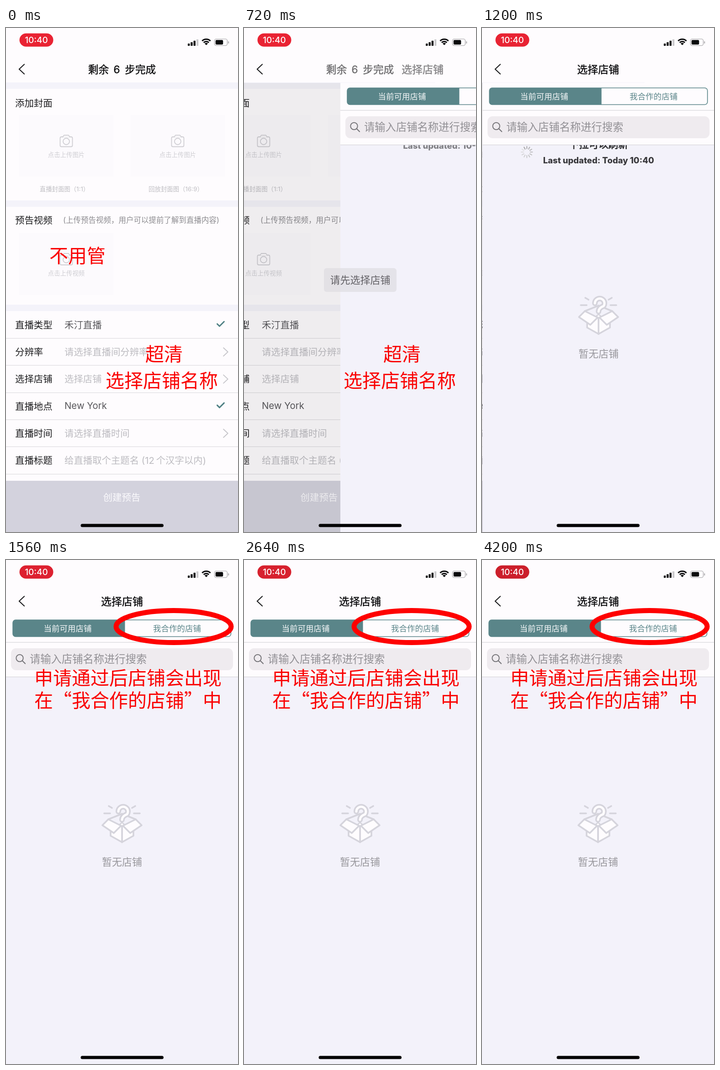
These frames come from a looping animation (508 px wide and 1102 px high, 4.32 s). An HTML page with a canvas:

```html
<!DOCTYPE html>
<html lang="zh-CN">
<head>
<meta charset="utf-8">
<title>选择店铺</title>
<style>
html, body { margin: 0; width: 100%; height: 100%; overflow: hidden; background: #fefcfe; }
canvas { display: block; width: 508px; height: 1102px; }
</style>
</head>
<body>
<canvas id="stage"></canvas>
<script>
const W = 508, H = 1102, LOOP = 4320, STEP = 120, TAU = Math.PI * 2;
const UI = 'Inter, "Noto Sans CJK SC", "Noto Sans CJK", sans-serif';
const HEI = '"Noto Sans CJK SC", "Noto Sans CJK", sans-serif';
const WHITE = '#fefcfe', MIST = '#f3f2fa', TEAL = '#5a8589', RED = '#fa0303';
const LINE = '#d8d7db', HINT = '#bdbcc1', PALE = '#cfced3', INK = '#1c1c1e', BLACK = '#0a0a0c';

const canvas = document.getElementById('stage');
const g = canvas.getContext('2d');
const dpr = window.devicePixelRatio || 1;
canvas.width = W * dpr;
canvas.height = H * dpr;

const clamp = v => Math.max(0, Math.min(1, v));
const mix = (a, b, k) => Math.round(a + (b - a) * k);

// Smooth ramp from 0 at time a to 1 at time b.
function ease(t, a, b) {
  const u = clamp((t - a) / (b - a));
  return u * u * (3 - 2 * u);
}

// y is the optical middle of the line; bold adds a thin outline.
function text(s, x, y, size, color, { align = 'left', weight = 400, font = UI, bold = 0 } = {}) {
  const latin = /^[\x00-\x7f]+$/.test(s);
  const base = y + size * (latin ? 0.35 : 0.375);
  g.font = `${weight} ${size}px ${font}`;
  g.textAlign = align;
  g.fillStyle = color;
  g.fillText(s, x, base);
  if (bold) {
    g.strokeStyle = color;
    g.lineWidth = bold;
    g.lineJoin = 'round';
    g.strokeText(s, x, base);
  }
}
const mid = (s, x, y, size, color, opt) => text(s, x, y, size, color, { align: 'center', ...opt });

function rect(x, y, w, h, color) {
  g.fillStyle = color;
  g.fillRect(x, y, w, h);
}

function paint(fill, stroke, lw) {
  if (fill) { g.fillStyle = fill; g.fill(); }
  if (stroke) { g.strokeStyle = stroke; g.lineWidth = lw; g.stroke(); }
}

function round(x, y, w, h, r, fill, stroke, lw) {
  g.beginPath();
  g.roundRect(x, y, w, h, r);
  paint(fill, stroke, lw);
}

function path(pts, color, lw, fill) {
  g.beginPath();
  for (let i = 0; i < pts.length; i += 2) g.lineTo(pts[i], pts[i + 1]);
  g.lineCap = g.lineJoin = 'round';
  if (fill && color !== fill) g.lineJoin = 'round';
  paint(fill, color, lw);
}

function arc(x, y, r, a, b, color, lw) {
  g.beginPath();
  g.arc(x, y, r, a, b);
  paint(null, color, lw);
}

function layer(alpha, draw) {
  if (alpha <= 0) return;
  g.save();
  g.globalAlpha = alpha;
  draw();
  g.restore();
}

function shifted(x, y, draw) {
  g.save();
  g.translate(x, y);
  draw();
  g.restore();
}

// dir 1 points right, -1 points left
const chevron = (x, y, w, h, dir, color, lw) =>
  path([x - dir * w, y - h, x + dir * w, y, x - dir * w, y + h], color, lw);
const tick = (x, y) => path([x - 7.5, y, x - 2.5, y + 5, x + 7.5, y - 5], '#4f8084', 3);

function camera() {
  round(-13.5, -9, 27, 21.5, 3, null, PALE, 1.8);
  path([-8, -8.5, -5, -12.5, 5, -12.5, 8, -8.5], PALE, 1.8, WHITE);
  arc(0, 1, 7, 0, TAU, PALE, 1.8);
}

function uploadCard(x, y, label) {
  rect(x - 103, y, 206, 135, '#fcfafd');
  shifted(x, y + 57, camera);
  mid(label, x, y + 87, 13.4, PALE);
}

const rows = [
  ['直播类型', '禾汀直播', 'check'],
  ['分辨率', '请选择直播间分辨率', 'more'],
  ['选择店铺', '选择店铺', 'more'],
  ['直播地点', 'New York', 'check'],
  ['直播时间', '请选择直播时间', 'more'],
  ['直播标题', '给直播取个主题名 (12\u2009个汉字以内)', '']
];

function formPage() {
  rect(0, 120, W, H - 120, WHITE);
  for (const y of [119, 377, 605]) rect(0, y, W, 14, '#f4f3fa');

  text('添加封面', 20, 164, 20.4, INK);
  uploadCard(132, 190, '点击上传图片');
  uploadCard(376, 190, '点击上传图片');
  mid('直播封面图（1:1）', 128, 352, 13.4, '#bfbec3');
  mid('回放封面图（16:9）', 372, 352, 13.4, '#bfbec3');

  text('预告视频', 20, 420, 20.4, INK);
  text('(上传预告视频，用户可以提前了解到直播内容)', 125, 420, 16.5, '#8d8c90');
  uploadCard(132, 448.5, '点击上传视频');

  rows.forEach(([label, value, mark], i) => {
    const y = 649 + i * 59.3;
    text(label, 20, y, 20.4, INK);
    text(value, 128, y - (value === 'New York' ? 1 : 0), 20.4, mark === 'check' ? '#59585c' : HINT);
    if (mark === 'check') tick(470, y - 2);
    if (mark === 'more') chevron(481, y, 4.8, 9, 1, '#c6c5ca', 1.9);
    rect(0, Math.round(y + 29), W, 1, LINE);
  });
  rect(0, 990, W, 112, '#d3d2dd');
  mid('创建预告', 253.5, 1026, 20.4, '#fbfafd');
}

function spinner(x, y) {
  for (let i = 0; i < 12; i++) {
    const a = i * TAU / 12 - TAU / 4, c = Math.cos(a), s = Math.sin(a);
    const v = mix(150, 220, ((i + 1) % 12) / 11);
    path([x + 7.5 * c, y + 7.5 * s, x + 12.3 * c, y + 12.3 * s], `rgb(${v},${v},${v})`, 2.1);
  }
}

// An open carton, drawn as one half and its mirror image.
function emptyBox() {
  const c = '#d5d4dc', w = 3.6;
  const both = half => {
    for (const side of [1, -1]) {
      g.save();
      g.scale(side, 1);
      half();
      g.restore();
    }
  };
  both(() => {
    path([26, -23, 39, -23], c, w);
    path([22, -35, 29, -39], c, w);
    path([30, -10, 0, -22], c, w);
    path([0, 4, 25, 13, 25, 26, 0, 40, 0, 4], c, w, WHITE);
  });
  for (const [color, lw] of [[c, 12], [WHITE, 5]]) {
    g.beginPath();
    g.arc(2.5, -27, 10.5, Math.PI, TAU + 0.6);
    g.quadraticCurveTo(0, -17, 0, -9);
    g.lineCap = 'round';
    paint(null, color, lw);
  }
  both(() => path([30, -10, 2, 4, 18, 20, 43, 3, 30, -10], c, w, WHITE));
  path([0, -3, 5, 1, 0, 5, -5, 1, 0, -3], c, 2.5, WHITE);
  mid('暂无店铺', 0, 83, 22, '#98979c');
}

function refreshHeader(t) {
  const pull = ease(t, 720, 960) - 1.4 * ease(t, 1080, 1420);
  const y = 258 + 53 * pull, done = t >= 1200;
  layer(pull < 0 ? 0 : 0.5 + 0.5 * pull, () => {
    mid(done ? '下拉可以刷新' : '正在刷新...', 254, y - 36, 21.5, BLACK, { bold: 0.8 });
    mid('Last updated: ' + (done ? 'Today 10:40' : '10-18 17:42'), 254, y, 18.5, BLACK, { weight: 800 });
    spinner(97, y - 18.5);
  });
}

function shopPage(t) {
  rect(0, 120, W, 136, WHITE);
  rect(0, 256, W, H - 256, MIST);

  g.save();
  g.beginPath();
  g.rect(0, 256, W, H - 256);
  g.clip();
  refreshHeader(t);
  if (t >= 1200) shifted(254, 577 + 52 * (1 - ease(t, 1200, 1440)), emptyBox);
  g.restore();

  round(15, 131, 477.5, 36.5, 6, WHITE, TEAL, 1.6);
  round(15, 131, 245.5, 36.5, [6, 0, 0, 6], TEAL);
  mid('当前可用店铺', 135, 149.5, 17.5, '#f6f8f9');
  mid('我合作的店铺', 374.5, 149.5, 17.5, TEAL);
  for (const y of [179.5, 255]) rect(0, y, W, 1.2, '#d6d5da');

  round(11, 193, 486, 48, 11, '#efebef');
  arc(30, 214.5, 7.7, 0, TAU, '#77767a', 2);
  path([35.7, 220.2, 42, 226.5], '#77767a', 2.2);
  text('请输入店铺名称进行搜索', 52, 216.5, 23.3, '#929095');
}

function statusBar(t) {
  // The recording badge stays bright at first, then breathes.
  const glow = 0.5 + 0.5 * Math.cos(TAU * Math.max(0, t - 1080) / 2160);
  round(29.5, 11.8, 74, 29, 14.5, `rgb(${mix(203, 233, glow)},${mix(31, 35, glow)},${mix(43, 51, glow)})`);
  mid('10:40', 66.5, 26.5, 19, '#fff', { weight: 500 });

  for (let i = 0; i < 4; i++) {
    const h = 5 + i * 3.1;
    round(398 + i * 6.3, 39 - h, 4.4, h, 1, i < 3 ? BLACK : '#cbcacd');
  }
  g.lineCap = 'butt';
  for (const r of [2.5, 8, 13]) arc(438.5, 37.5, r, -TAU * 3 / 8, -TAU / 8, BLACK, r < 5 ? 5 : 3);
  round(456.5, 24, 28, 14.5, 4, null, '#a3a2a5', 1.2);
  round(458.8, 26.3, 16.5, 10, 2.2, BLACK);
  round(486.4, 29, 1.8, 5, 1, '#a3a2a5');
}

function titles(t, x) {
  const old = clamp((x - 40) / 310);
  const slide = x > 0 ? 137 * Math.exp((720 - t) / 72.5) : 0;
  layer(old, () => mid('剩余\u2009 6\u2009 步完成', 254, 90, 22.7, BLACK, { bold: 0.4 }));
  layer(1 - old, () => mid('选择店铺', 254 + slide, 90, 23, BLACK, { bold: 0.4 }));
  chevron(34.4, 90, 5.6, 10.5, -1, '#222224', 2.3);
}

function notes(t) {
  const note = (s, x, y) => text(s, x, y, 41, RED, { font: HEI });
  if (t < 360) note('不用管', 95, 498);
  if (t < 960) note('超清', 305, 713);
  if (t < 1200) note('选择店铺名称', 218, 771);
  if (t >= 1560) {
    g.beginPath();
    g.ellipse(367, 145.5, 126, 35, 0, 0, TAU);
    paint(null, '#fe0000', 11);
    note('申请通过后店铺会出现', 62, 258);
    note('在“我合作的店铺”中', 62, 306.5);
  }
}

// Left edge of the pushed page, decaying to its place.
function edge(t) {
  if (t < 640) return W;
  return t > 1260 ? 0 : Math.min(W, 211 * Math.exp((720 - t) / 93));
}

function draw(t) {
  const x = edge(t);
  g.setTransform(dpr, 0, 0, dpr, 0, 0);
  rect(0, 0, W, H, WHITE);

  if (x > 0) {
    shifted(-0.3 * (W - x), 0, formPage);
    rect(0, 120, W, H - 120, `rgba(0,0,0,${0.1 * (1 - x / W)})`);
  }
  if (x < W) shifted(x, 0, () => shopPage(t));
  titles(t, x);
  statusBar(t);

  layer(ease(t, 120, 360) - ease(t, 600, 900), () => {
    round(175, 525, 159, 52, 6, '#dedce1');
    mid('请先选择店铺', 254.5, 551, 22, '#1c1b1f');
  });
  notes(t);
  round(163.5, 1084.2, 181.5, 7, 3.5, '#050505');
}

const start = performance.now();
function frame() {
  const t = (performance.now() - start) % LOOP;
  draw(Math.floor(t / STEP) * STEP);
  requestAnimationFrame(frame);
}
frame();
</script>
</body>
</html>
```
